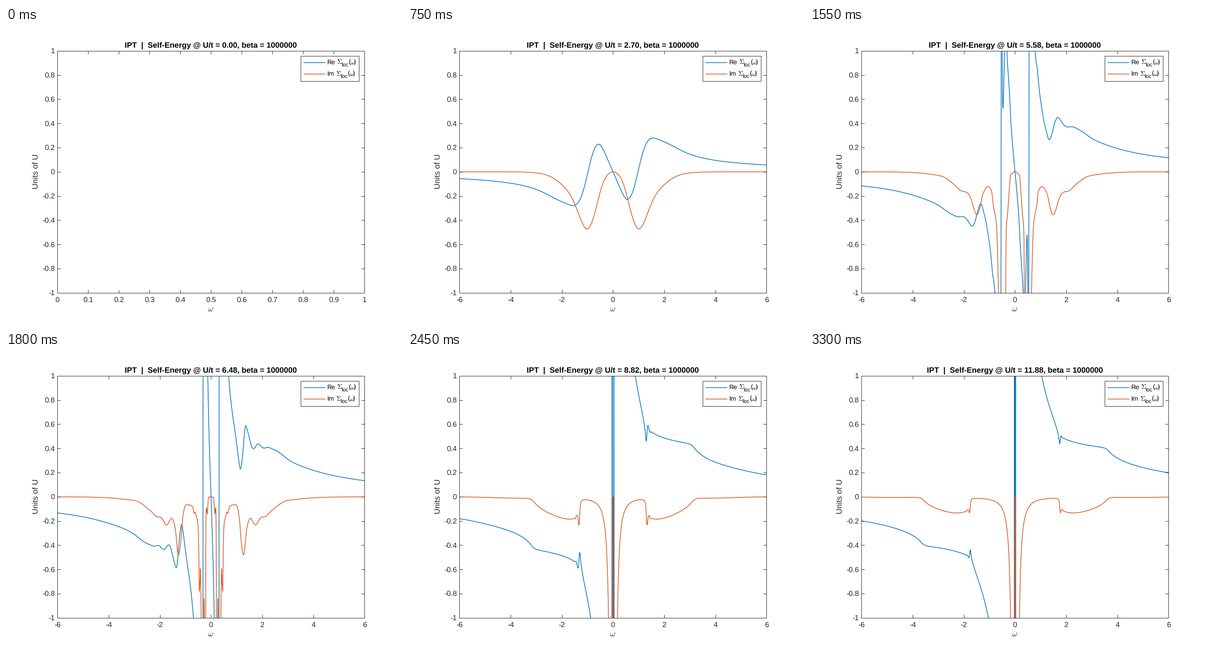
A matplotlib script for the animation above (3.35 s loop, 864 by 648 pixels).

```python
import numpy as np
import matplotlib.pyplot as plt
from matplotlib.animation import FuncAnimation
from matplotlib.patches import Rectangle

W, H = 864, 648
LEFT, RIGHT, TOP, BOTTOM = 112.3, 782.3, 49.7, 577.7
FRAMES, STEP_MS = 67, 50
U_STEP = 0.18                      # in units of t = D / 2
BLUE, ORANGE, INK = "#0072BD", "#D95319", "#262626"

plt.rcParams.update({
    "font.family": "Liberation Sans",
    "mathtext.fontset": "cm",
    "text.hinting": "none",
    "path.simplify": False,
})

# ---- Iterated perturbation theory on the Bethe lattice (D = 1, T = 0) ----
# Particle-hole symmetry: only positive frequencies are stored.
HALF = 2048
dw = 12 / (2 * HALF - 1)
w = (np.arange(HALF) + 0.5) * dw
ETA = 2 * dw


def bethe(z):
    return 2 / (z + np.sqrt(z - 1) * np.sqrt(z + 1))


def self_energy(g, u):
    """Second-order diagram from the Weiss field of the local function g."""
    a = -(1 / (w + 1j * ETA - g / 4)).imag / np.pi
    triple = np.fft.irfft(np.fft.rfft(a, 4 * HALF) ** 3, 4 * HALF)
    im = np.zeros(HALF)
    im[2:] = triple[:HALF - 2]     # grid offset of the two convolutions
    im = np.minimum(-np.pi * (u * dw) ** 2 * im, -1e-9)
    both = np.concatenate([im[::-1], im])
    re = np.fft.irfft(1j * np.fft.rfft(both, 8 * HALF), 8 * HALF)
    return re[HALF:2 * HALF] + 1j * im


def bare_u(u):
    """The finite frequency window weakens the strongest couplings."""
    return u - 0.25 * max(0, u - 4.4) ** 2


def sweep(mix=0.6, loops=60, tol=1e-4):
    """Follow the solution from the free lattice up in U; returns Sigma / U."""
    g = bethe(w + 1e-9j)
    out = [None]
    for k in range(1, FRAMES):
        u = k * U_STEP / 2
        for _ in range(loops):
            sigma = self_energy(g, bare_u(u))
            delta = bethe(w - sigma) - g
            g = g + mix * delta
            if np.abs(delta).max() < tol:
                break
        out.append(sigma / u)
    return out


SIGMA = sweep()

# ---- Stage ----
fig = plt.figure(figsize=(W / 72, H / 72), dpi=72, facecolor="white")


def put(x, y, text, size, **kw):
    kw.setdefault("color", INK)
    kw.setdefault("va", "baseline")
    return fig.text(x / W, 1 - y / H, text, fontsize=size, **kw)


ax = fig.add_axes([LEFT / W, 1 - BOTTOM / H,
                   (RIGHT - LEFT) / W, (BOTTOM - TOP) / H])
ax.set_ylim(-1, 1)
ax.set_yticks(np.linspace(-1, 1, 11))
ax.tick_params(direction="in", length=6.7, width=1, color=INK, top=True,
               right=True, labelbottom=False, labelleft=False)
for spine in ax.spines.values():
    spine.set(color=INK, linewidth=1)

re_line, = ax.plot([], [], color=BLUE, lw=1.5)
im_line, = ax.plot([], [], color=ORANGE, lw=1.5)

for k in range(-5, 6):
    y = (TOP + BOTTOM) / 2 - k * (BOTTOM - TOP) / 10
    put(106.5, y + 5.3, f"{k / 5:g}", 16, ha="right")


def x_labels(values):
    lo, hi = values[0], values[-1]
    return [put(LEFT + (v - lo) / (hi - lo) * (RIGHT - LEFT), 598,
                f"{v:g}", 16, ha="center") for v in values]


UNIT_TICKS = [k / 10 for k in range(11)]
WIDE_TICKS = list(range(-6, 7, 2))
unit_labels = x_labels(UNIT_TICKS)
wide_labels = x_labels(WIDE_TICKS)

title = put(447, 43, "", 17, ha="center", weight="bold", color="black")
put(446.5, 619, r"$\omega$", 18, ha="center")
put(70, 313, "Units of U", 17.4, rotation=90, rotation_mode="anchor",
    ha="center")


# ---- Legend ----
def legend_row(y, name, color, shift):
    fig.add_artist(plt.Line2D([650 / W, 696 / W], [1 - y / H] * 2,
                              color=color, lw=1.5, snap=False))
    base = y + 3
    put(700.5, base, name, 14, color="black")
    for x, dy, text, size in ((722, 0, r"$\Sigma$", 14.5),
                              (732.5, 5.5, "loc", 11.5),
                              (747, 0, "(", 14),
                              (751, 0, r"$\omega$", 14.5),
                              (758.7, 0, ")", 14)):
        put(x + shift, base + dy, text, size, color="black")


fig.add_artist(Rectangle((643.3 / W, 1 - 115.7 / H), 127 / W, 55 / H,
                         facecolor="white", edgecolor=INK, lw=1))
legend_row(75.5, "Re", BLUE, 0)
legend_row(100.5, "Im", ORANGE, -2)


def update(i):
    title.set_text(f"IPT  |  Self-Energy @ U/t = {i * U_STEP:.2f}, "
                   "beta = 1000000")
    empty = i == 0
    ticks = UNIT_TICKS if empty else WIDE_TICKS
    ax.set_xticks(ticks)
    ax.set_xlim(ticks[0], ticks[-1])
    for label in unit_labels:
        label.set_visible(empty)
    for label in wide_labels:
        label.set_visible(not empty)
    if empty:
        re_line.set_data([], [])
        im_line.set_data([], [])
    else:
        re, im = SIGMA[i].real, SIGMA[i].imag
        x = np.concatenate([-w[::-1], w])
        re_line.set_data(x, np.concatenate([-re[::-1], re]))
        im_line.set_data(x, np.concatenate([im[::-1], im]))
    return re_line, im_line, title


anim = FuncAnimation(fig, update, frames=FRAMES, interval=STEP_MS, repeat=True)
plt.show()
```
